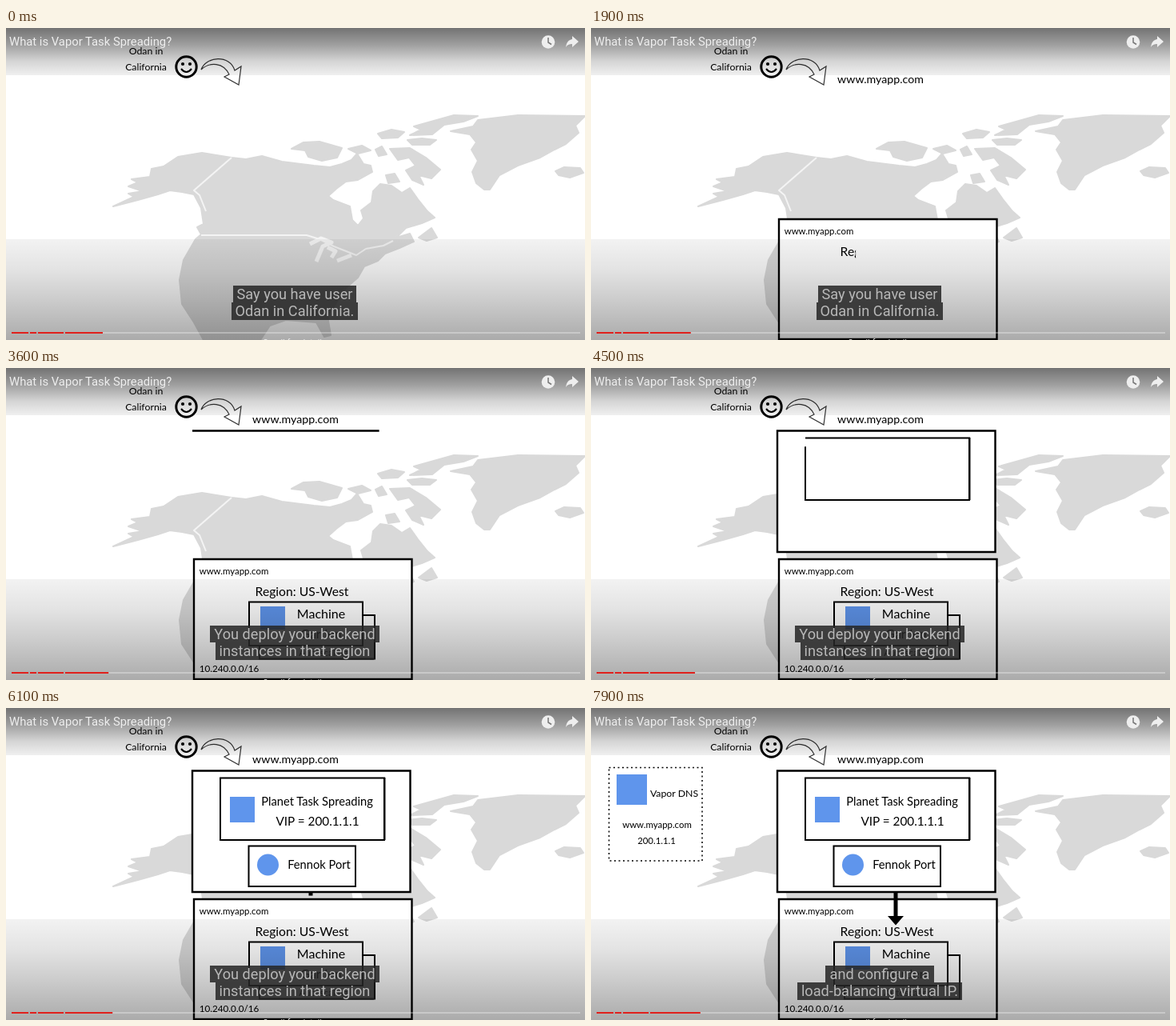
Recreate the animation shown at these times as an HTML page. Size 724 by 390 pixels, loop 8 s.

```html
<!DOCTYPE html>
<html lang="en">
<head>
<meta charset="utf-8">
<title>Load balancing lesson</title>
<style>
  html, body { margin: 0; width: 100%; height: 100%; overflow: hidden; background: #fff; }
  svg { position: absolute; left: 0; top: 0; }
  .note { font-family: Lato, sans-serif; text-anchor: middle; fill: #000; }
  .ui { font-family: Roboto, sans-serif; fill: #eee; }
  .draw { fill: none; stroke: #000; stroke-width: 2; }
  .region { stroke-width: 2.4; }
  .map { fill: #d9d9d9; stroke: #d9d9d9; stroke-width: 2; stroke-linejoin: round; }
  .border { fill: none; stroke: #f4f4f4; stroke-width: 2; stroke-linejoin: round; }
  .logo { fill: #5f95ec; }
  #captions { position: absolute; left: 0; top: 321.500px; width: 722px; }
  #captions span {
    display: table; margin: 0 auto; padding: 0 5px; white-space: nowrap;
    font: 18.200px/21.500px Roboto, sans-serif; color: #b8b8b8; background: rgba(38, 38, 38, .86);
  }
</style>
</head>
<body>
<svg width="724" height="390" viewBox="0 0 724 390">
  <defs>
    <linearGradient id="top" x2="0" y2="1">
      <stop offset="0" stop-opacity=".55"/>
      <stop offset=".35" stop-opacity=".38"/>
      <stop offset=".7" stop-opacity=".17"/>
      <stop offset="1" stop-opacity=".06"/>
    </linearGradient>
    <linearGradient id="bottom" x2="0" y2="1">
      <stop offset="0" stop-opacity=".05"/>
      <stop offset=".3" stop-opacity=".11"/>
      <stop offset=".6" stop-opacity=".2"/>
      <stop offset="1" stop-opacity=".33"/>
    </linearGradient>
  </defs>

  <g class="map">
    <path d="M134 223L160 211 153 207 171 204 153 198 165 193 157 189 180 186 182 176 197 173 215 161 245 156 282 162 300 164 320 160 345 167 385 172 405 174 420 170 432 165 439 157 447 170 456 172 458 180 440 190 425 192 413 201 403 210 409 215 430 223 433 240 440 247 447 238 444 228 457 218 459 204 468 195 482 197 495 206 505 200 515 214 527 229 536 237 520 244 500 250 488 262 505 257 510 267 492 275 474 282 465 291 448 298 440 312 425 325 412 345 402 360 406 384 398 386 388 368 350 365 330 372 318 390H247L235 368 220 345 217 315 222 290 237 264 244 258 239 249 247 245 244 225 235 208 220 205 205 203 190 208 165 215Z"/>
    <path d="M357 151L372 143 392 142 420 150 414 162 395 166 378 161 374 153ZM428 151L445 147 456 153 440 157ZM465 132L482 127 498 130 490 137 470 138ZM462 152L470 148 476 158 466 160Z"/>
    <path d="M480 151L505 150 525 162 543 177 532 188 516 184 522 196 508 190 500 178 512 172 504 162 490 165ZM475 184L486 182 492 192 478 194Z"/>
    <path d="M510 123L535 116 560 109 590 110 572 117 548 121 533 133 505 134 519 127ZM502 140L520 138 538 140 530 146 508 146Z"/>
    <path d="M556 129L584 123 590 115 640 109 724 110 712 122 716 131 700 145 686 152 668 162 640 172 617 184 605 202 598 202 588 194 583 180 590 166 582 152 588 143 580 133Z"/>
    <path d="M687 179L698 174 718 175 722 181 705 187 691 184ZM516 262L532 250 539 262 526 266Z"/>
  </g>
  <g class="border">
    <path d="M282 162L235 203 242 209 250 229M244 259H376L392 264 410 273 438 284 450 276 472 272 484 266"/>
    <path d="M380 270L394 263 407 268 396 273 388 292M402 274L412 279 407 287M414 291L432 284" stroke-width="5"/>
  </g>

  <g class="note" font-size="12.300">
    <text x="175" y="33">Odan in</text>
    <text x="175" y="53">California</text>
  </g>
  <circle cx="225.500" cy="48.500" r="12.700" fill="none" stroke="#000" stroke-width="3"/>
  <circle cx="221" cy="45" r="2.100"/>
  <circle cx="230" cy="45" r="2.100"/>
  <path d="M219 51Q225.500 59 232 51" fill="none" stroke="#000" stroke-width="2"/>
  <path d="M244 52C250 35 280 33 286 53L294 48 291 71 273 61 279 58C272 43 255 42 244 52Z" fill="#fff" stroke="#333" stroke-width="1.200"/>

  <text class="note" data-at="700" data-for="300" x="362" y="69" font-size="14.200">www.myapp.com</text>

  <path class="draw region" data-at="1000" data-for="486" data-fill d="M235 239H507.500V389H235Z"/>
  <g class="note">
    <text data-at="1600" data-for="250" x="285" y="258" font-size="11.400">www.myapp.com</text>
    <text data-at="1850" data-for="300" x="370" y="285" font-size="15.700">Region: US-West</text>
    <text data-at="2150" data-for="200" x="279" y="380" font-size="11.700">10.240.0.0/16</text>
  </g>
  <path class="draw" data-at="2300" data-for="250" data-fill d="M317 309H461V363.500H317Z"/>
  <text class="note" data-at="2900" data-for="200" x="397" y="360" font-size="12">Autoscaling</text>
  <path class="draw" data-at="2560" data-for="254" data-fill d="M304 292.500H446V347H304Z"/>
  <rect class="logo" data-at="2900" data-for="100" x="318" y="298" width="31" height="29"/>
  <g class="note" font-size="16">
    <text data-at="3000" data-for="200" x="394" y="313">Machine</text>
    <text data-at="3200" data-for="200" x="394" y="338">Garden</text>
  </g>

  <path class="draw region" data-at="3465" data-for="490" data-fill d="M233 78.500H505.500V230H233Z"/>
  <path class="draw" data-at="4190" data-for="316" data-fill d="M268 87.500H473V165H268Z"/>
  <path class="draw" data-at="4300" data-for="50" d="M473.500 87V165"/>
  <rect class="logo" data-at="4550" data-for="150" x="280" y="111" width="31" height="32"/>
  <g class="note">
    <text data-at="4700" data-for="400" x="389" y="122" font-size="14.700">Planet Task Spreading</text>
    <text data-at="5100" data-for="300" x="389.500" y="147" font-size="15.300">VIP = 200.1.1.1</text>
  </g>
  <path class="draw" data-at="5400" data-for="270" data-fill d="M303.500 172.500H437V223H303.500Z"/>
  <circle class="logo" data-at="5650" data-for="150" cx="327.500" cy="196" r="13.500"/>
  <text class="note" data-at="5800" data-for="200" x="391.500" y="201" font-size="14.700">Fennok Port</text>

  <path class="draw" data-at="6050" data-for="450" style="stroke-width:5" d="M381 231V263"/>
  <path data-at="6500" data-for="200" d="M371 260H391L381 271.500Z"/>

  <path class="draw" data-at="7000" data-for="300" data-wipe stroke-dasharray="2 3.500" style="stroke-width:1.500" d="M22.500 74.500H139V191H22.500Z"/>
  <rect class="logo" data-at="7250" data-for="150" x="32" y="83" width="38" height="38"/>
  <g class="note" font-size="11.400">
    <text data-at="7350" data-for="150" x="104" y="111" font-size="12.300">Vapor DNS</text>
    <text data-at="7500" data-for="150" x="82.500" y="150">www.myapp.com</text>
    <text data-at="7650" data-for="150" x="82" y="170">200.1.1.1</text>
  </g>

  <rect width="724" height="59" fill="url(#top)"/>
  <rect y="264" width="724" height="126" fill="url(#bottom)"/>

  <g class="ui">
    <text x="4" y="22" font-size="14.800">What is Vapor Task Spreading?</text>
    <text x="361" y="397" font-size="11" text-anchor="middle">Scroll for details</text>
    <circle cx="678" cy="17.500" r="8.300"/>
    <path d="M678 12V18L682 20.500" fill="none" stroke="#777" stroke-width="1.500"/>
    <path d="M708 10L716 17 708 24V20C704 20 702 21 700 24 701 18 703 15 708 14Z"/>
  </g>
  <rect x="7" y="380" width="711" height="2" fill="#fff" opacity=".3"/>
  <rect id="played" x="7" y="380" height="2" fill="#e0201c"/>
  <path d="M29 379.500V382.500M39 379.500V382.500M73 379.500V382.500" stroke="#aaa" stroke-width="2"/>
</svg>
<div id="captions"><span></span><span></span></div>

<script>
const LOOP = 8000, STEP = 100;
const captions = [
  [0, "Say you have user", "Odan in California."],
  [3400, "You deploy your backend", "instances in that region"],
  [7000, "and configure a", "load-balancing virtual IP."]
];
const parts = [...document.querySelectorAll("[data-at]")];
const lines = document.querySelectorAll("#captions span");
const played = document.getElementById("played");

const isStroke = el => el.classList.contains("draw") && !("wipe" in el.dataset);
parts.filter(isStroke).forEach(el => el.setAttribute("pathLength", 1));

function reveal(el, time) {
  const p = Math.max(0, Math.min(1, (time - el.dataset.at) / el.dataset.for));
  el.style.visibility = p > 0 ? "visible" : "hidden";
  if (isStroke(el)) {
    el.style.strokeDasharray = p < 1 ? `${p} 2` : "none";
    if ("fill" in el.dataset) el.style.fill = p < 1 ? "none" : "#fff";
  } else {
    el.style.clipPath = p < 1 ? `inset(0 ${100 - p * 100}% 0 0)` : "none";
  }
}

function render(now) {
  const time = Math.floor((now % LOOP) / STEP) * STEP;
  parts.forEach(el => reveal(el, time));
  played.setAttribute("width", 114 + time * 0.002);
  const [, ...words] = captions.findLast(c => c[0] <= time);
  lines.forEach((line, i) => {
    if (line.textContent !== words[i]) line.textContent = words[i];
  });
}

const start = performance.now();
function tick() {
  render(performance.now() - start);
  requestAnimationFrame(tick);
}
tick();
</script>
</body>
</html>
```
